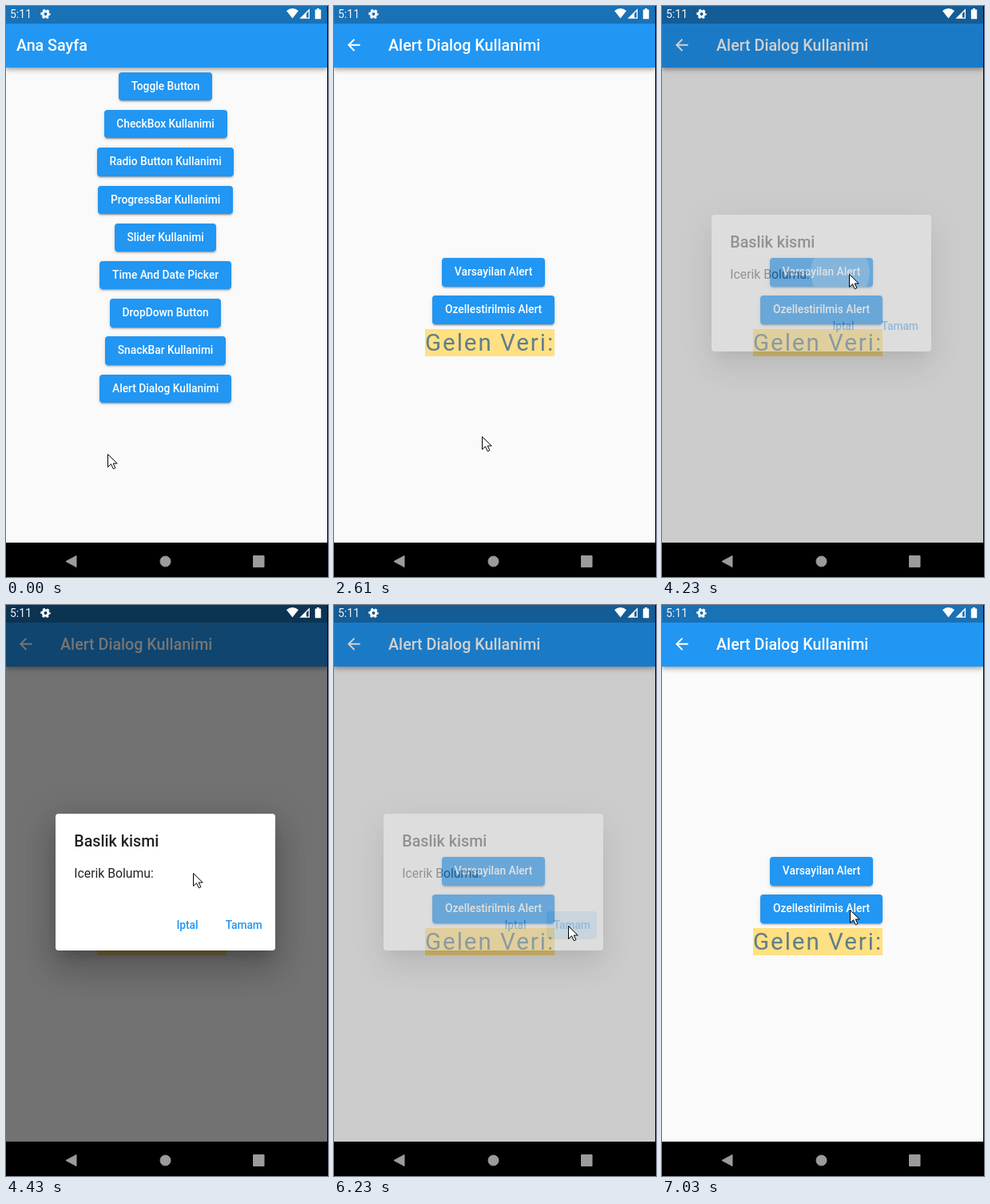
An HTML page for the animation above (8 s loop, 403x714 px).

```html
<!DOCTYPE html>
<html lang="tr">
<head>
<meta charset="utf-8">
<title>Alert Dialog Kullanimi</title>
<style>
html, body { margin: 0; width: 100%; height: 100%; overflow: hidden; background: #000; }
body { position: relative; font-family: Roboto, sans-serif; }
body * { box-sizing: border-box; }
.screen { position: absolute; left: 0; top: 0; width: 402px; height: 671px; overflow: hidden; }
.page { position: absolute; inset: 0; background: #fafafa; }
.bar {
  position: absolute; left: 0; top: 0; width: 100%; height: 77px; background: #2196f3; color: #fff;
  box-shadow: 0 2px 4px -1px #0003, 0 4px 5px #00000024, 0 1px 10px #0000001f;
}
.bar::before { content: ""; position: absolute; left: 0; top: 0; width: 100%; height: 22px; background: #00000040; }
/* Zero line height: top is the vertical middle of the text. */
.label { position: absolute; line-height: 0; white-space: nowrap; }
.title { font-size: 19.68px; font-weight: 500; }
.buttons { position: absolute; left: 0; width: 399.2px; display: flex; flex-direction: column; align-items: center; gap: 11.83px; }
.button {
  position: relative; overflow: hidden; height: 35.42px; line-height: 35.42px; padding: 0 15.74px; border-radius: 4px;
  background: #2196f3; color: #fff; font-size: 13.78px; font-weight: 500; white-space: nowrap;
  box-shadow: 0 3px 1px -2px #0003, 0 2px 2px #00000024, 0 1px 5px #0000001f;
}
#ripple { position: absolute; left: 51px; top: -19px; width: 74px; height: 74px; border-radius: 50%; background: #ffffff3d; }
.result {
  position: absolute; left: 114px; top: 403.7px; height: 34.4px; line-height: 34.4px; white-space: nowrap;
  background: #ffe082; color: #607d8b; font-size: 29.52px; letter-spacing: 1.97px;
}
#barrier { position: absolute; inset: 0; background: #0000008a; }
#dialog {
  position: absolute; left: 61.7px; top: 260.7px; width: 275.6px; height: 171.3px; border-radius: 4px;
  background: #fff; color: #000000de;
  box-shadow: 0 11px 15px -7px #0003, 0 24px 38px 3px #00000024, 0 9px 46px 8px #0000001f;
}
.action {
  position: absolute; top: 122px; height: 35.4px; line-height: 35.4px; width: 63px; border-radius: 4px;
  text-align: center; color: #2196f3; font-size: 13.78px; font-weight: 500;
}
svg { position: absolute; left: 0; top: 0; }
</style>
</head>
<body>
<div class="screen">
  <div class="page">
    <div class="bar"><span class="label title" style="left:13px;top:49.5px">Ana Sayfa</span></div>
    <div class="buttons" id="menu" style="top:82.8px"></div>
  </div>
  <div class="page" id="alertPage">
    <div class="bar">
      <svg style="left:13px;top:37.2px" width="23.6" height="23.6" viewBox="0 0 24 24" fill="#fff"><path d="M20 11H7.83l5.59-5.59L12 4l-8 8 8 8 1.41-1.41L7.83 13H20z"/></svg>
      <span class="label title" style="left:68px;top:49.5px">Alert Dialog Kullanimi</span>
    </div>
    <div class="buttons" style="top:315.2px">
      <div class="button">Varsayilan Alert<i id="ripple"></i></div>
      <div class="button">Ozellestirilmis Alert</div>
    </div>
    <div class="result">Gelen Veri:</div>
  </div>
  <div id="barrier"></div>
  <div id="dialog">
    <span class="label title" style="left:23.6px;top:35.5px">Baslik kismi</span>
    <span class="label" style="left:23.6px;top:75px;font-size:15.74px">Icerik Bolumu:</span>
    <div class="action" style="left:133.8px">Iptal</div>
    <div class="action" style="left:204.6px" id="confirm">Tamam</div>
  </div>
</div>
<svg width="403" height="714">
  <g fill="#fff">
    <text x="5" y="15" font-size="14" fill="#f0f4f8">5:11</text>
    <circle cx="49.5" cy="10" r="3.4" fill="none" stroke="#fff" stroke-width="2.8"/>
    <circle cx="49.5" cy="10" r="5.2" fill="none" stroke="#fff" stroke-width="2" stroke-dasharray="2.9 2.545" stroke-dashoffset="1.45"/>
    <path d="M351 6Q358.5 .2 366 6L358.5 15.5z"/>
    <path d="M380 3.2V15.8H367.4zM378.7 6.5L376 9.2V14.5H378.7z" fill-rule="evenodd"/>
    <path d="M389 3h3v1.5h2.2v11.7h-7.4V4.500h2.200z"/>
  </g>
  <g fill="#9b9b9b" stroke="#9b9b9b" stroke-linejoin="round">
    <path d="M75 694.500L88 687.500V701.500z"/>
    <circle cx="199.500" cy="694.500" r="6.500"/>
    <path d="M309.500 687.500h13.500v14h-13.500z"/>
  </g>
  <circle id="click" r="12" fill="#f4f400" fill-opacity=".6"/>
  <path id="cursor" d="M.5.5V16.500l4-3.700 2.800 6 2.600-1.200-2.700-5.600h5z" fill="#fff" stroke="#000"/>
</svg>
<script>
const $ = id => document.getElementById(id);
const LOOP = 8000, STEP = 200;

$('menu').innerHTML = ['Toggle Button', 'CheckBox Kullanimi', 'Radio Button Kullanimi', 'ProgressBar Kullanimi',
  'Slider Kullanimi', 'Time And Date Picker', 'DropDown Button', 'SnackBar Kullanimi', 'Alert Dialog Kullanimi']
  .map(name => `<div class="button">${name}</div>`).join('');

// Each move: start time, number of steps, destination.
const moves = [
  [390, 3, 196, 477],
  [2410, 2, 185, 538],
  [2810, 4, 301, 442],
  [3610, 2, 234, 335],
  [5230, 4, 293, 401],
  [6430, 4, 235, 381]
];

function cursorAt(t) {
  let x = 127, y = 560;
  for (const [start, steps, toX, toY] of moves) {
    if (t < start) break;
    const p = Math.min(1, (Math.floor((t - start) / STEP) + 1) / steps);
    x += (toX - x) * p;
    y += (toY - y) * p;
  }
  return [Math.round(x), Math.round(y)];
}

function draw(t) {
  const within = (from, to) => t >= from && t < to;
  const place = `translate(${cursorAt(t)})`;
  $('cursor').setAttribute('transform', place);
  $('click').setAttribute('transform', place);
  $('click').style.opacity = +(within(1190, 1390) || within(6030, 6230));

  const entering = within(2410, 2610);
  $('alertPage').style.opacity = t < 2410 ? 0 : entering ? 0.4 : 1;
  $('alertPage').style.transform = entering ? 'translateY(34px)' : 'none';

  const shown = within(4430, 6230) ? 1 : within(4230, 6430) ? 0.34 : 0;
  $('barrier').style.opacity = $('dialog').style.opacity = shown;
  $('ripple').style.opacity = +within(4230, 4430);
  const tint = within(6230, 6430) ? 0.24 : within(5830, 6230) ? 0.04 : 0;
  $('confirm').style.background = `rgba(33,150,243,${tint})`;
}

function frame() {
  draw(performance.now() % LOOP);
  requestAnimationFrame(frame);
}
frame();
</script>
</body>
</html>
```
